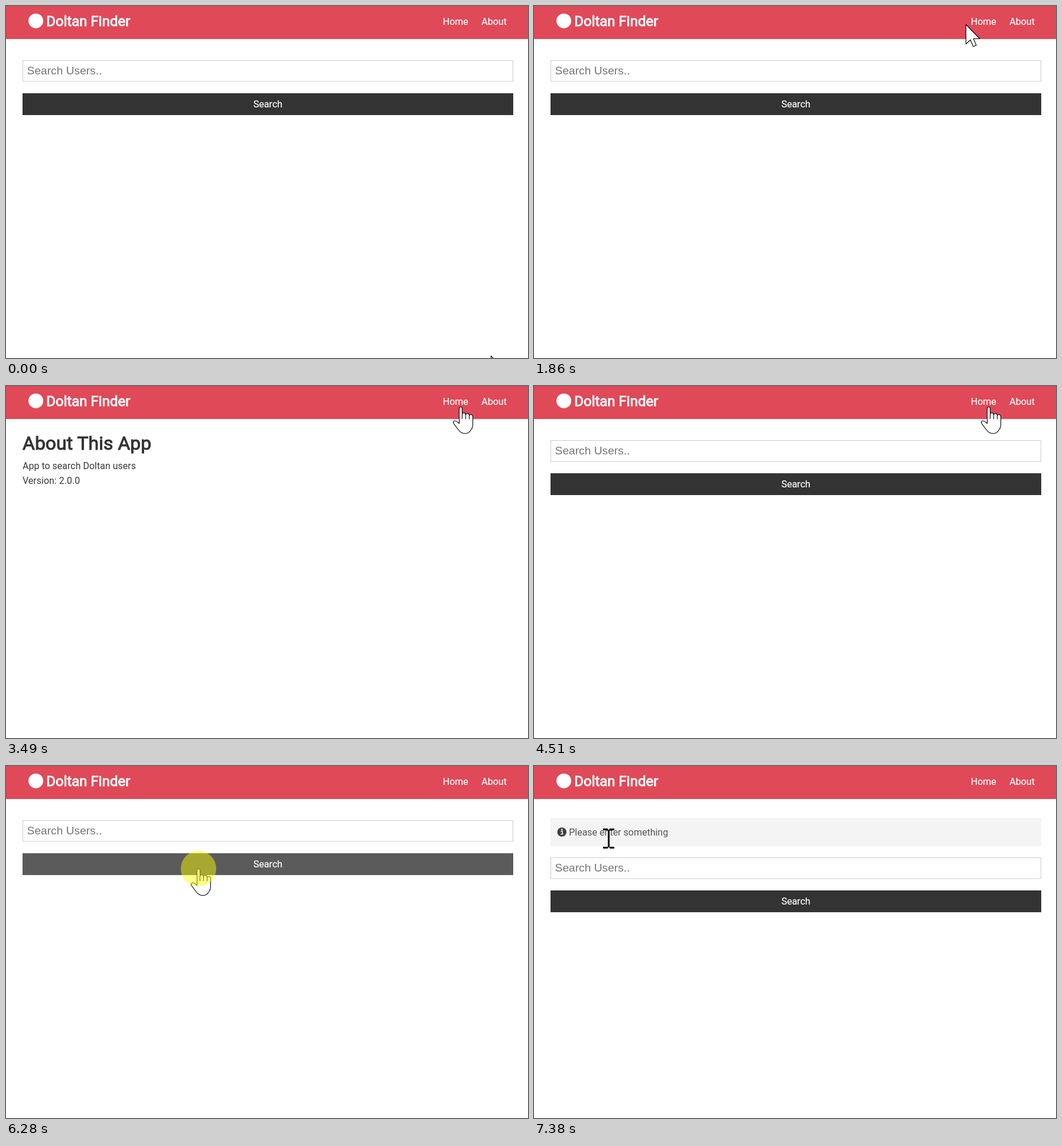
Write an HTML page that moves like this. It is 884 by 597 pixels and loops after 7.99 s.

```html
<!DOCTYPE html>
<html lang="en">
<head>
<meta charset="utf-8">
<title>Doltan Finder</title>
<style>
  html, body { margin: 0; width: 100%; height: 100%; overflow: hidden; background: #fff; }
  svg { display: block; width: 884px; height: 597px; }
  text { font: 16px Roboto, sans-serif; fill: #3a3a3a; white-space: pre; }
  .light { fill: #fff; stroke: #fff; stroke-width: .2px; }
  .logo { font-size: 24px; fill: #fff; stroke: #fff; stroke-width: .9px; }
  .title { font-size: 32px; fill: #333; stroke: #333; stroke-width: 1px; }
  .hint { font: 19.2px "Liberation Sans", Arial, sans-serif; fill: #757575; }
  .mouse { fill: #fff; stroke: #000; stroke-width: 1.1; stroke-linejoin: round; stroke-linecap: round; }
</style>
</head>
<body>
<svg viewBox="0 0 884 597">
  <rect width="884" height="56" fill="#e04958"/>
  <circle cx="50.5" cy="25.2" r="12.5" fill="#fff"/>
  <text class="logo" x="68.2" y="34">Doltan Finder</text>
  <text class="light" x="739.8" y="32">Home</text>
  <text class="light" x="805.3" y="32">About</text>

  <g id="aboutPage">
    <text class="title" x="28" y="108">About This App</text>
    <text x="28" y="141">App to search Doltan users</text>
    <text x="28" y="166">Version: 2.0.0</text>
  </g>

  <g id="searchPage">
    <g id="alert">
      <rect x="28" y="88" width="831" height="48" fill="#f4f4f4"/>
      <circle cx="47.2" cy="112" r="7.8" fill="#404040"/>
      <path d="M45.2 110.9h3v4.3M45 115.6h4.6" fill="none" stroke="#f4f4f4" stroke-width="1.5"/>
      <circle cx="47.2" cy="108" r="1.4" fill="#f4f4f4"/>
      <text x="59.2" y="118" fill-opacity=".85">Please enter something</text>
    </g>
    <g id="form">
      <rect x="28.5" y="92.5" width="830" height="35.5" fill="#fff" stroke="#ccc"/>
      <text class="hint" x="35.6" y="116">Search Users..</text>
      <rect id="button" x="28" y="148" width="831" height="37" fill="#333"/>
      <text class="light" x="443.5" y="172" text-anchor="middle">Search</text>
    </g>
  </g>

  <g id="cursor">
    <path class="mouse" id="arrow" d="M.5.5V33.5L8 26.5 13 37.8 18 35.7 13.3 24.5H24Z"/>
    <g class="mouse" id="hand">
      <path d="M-2.5 3Q-2.5.5 0 .5T2.5 3V12.5Q3 10.5 5.5 10.5T8.5 13.5Q9 11.5 11.5 11.5T14.5 15Q15 13.5 17.5 13.5T20.5 17V30Q20.5 36 17 40 14 45.5 7.5 45.5 1 45.5-3 40.5L-11.7 29Q-13.8 25.5-11 24.2-8.5 23-2.5 28.5Z"/>
      <path fill="none" d="M2.5 12V20.5M8.5 13V20.5M14.5 14V21"/>
    </g>
    <path id="beam" d="M-9.5-17h8v3h-8zM1.5-17h8v3h-8zM-9.5 14h8v3h-8zM1.5 14h8v3h-8zM-1.5-15h3v30h-3z"/>
    <circle id="click" r="30" fill="#ff0" fill-opacity=".47"/>
  </g>
</svg>
<script>
const LOOP = 7990, TICK = 77.6, LEAD = 20;
const ABOUT = 33, HOME = 58, ALERT = 83; // ticks at which the page changes
const SHIFT = 63;                        // the alert pushes the form down

// Each move: first tick, last tick, x, y, power (over 1 speeds up, under 1 slows down)
const origin = [821, 593];
const moves = [
  [0, 3, 545, 359, 1],
  [4, 14, 204, 139, 1],
  [14, 16, 120, 76, .6],
  [19, 24, 731, 31, 1.4],
  [24, 28, 818, 31, .6],
  [41, 45, 770, 35, .6],
  [63, 69, 402, 108, 1.3],
  [69, 72, 327, 182, .6],
  [73, 77, 326, 174, 1],
  [90, 95, 126.5, 123, 1]
];

const ui = {};
document.querySelectorAll("[id]").forEach(el => ui[el.id] = el);
const show = (el, on) => el.setAttribute("visibility", on ? "inherit" : "hidden");

function pointer(n) {
  let [x, y] = origin;
  for (const [from, to, x1, y1, power] of moves) {
    if (n <= from) break;
    const k = Math.min(1, (n - from) / (to - from)) ** power;
    x += (x1 - x) * k;
    y += (y1 - y) * k;
  }
  return [x, y];
}

function state(n) {
  const [x, y] = pointer(n);
  const about = n >= ABOUT && n < HOME;
  const alert = n >= ALERT;
  const dy = alert ? SHIFT : 0;
  const over = (x0, y0, x1, y1) => x >= x0 && x < x1 && y >= y0 && y < y1;
  const button = !about && over(28, 148 + dy, 859, 185 + dy);
  const link = over(732.5, 10, 790, 43) || over(798, 10, 855, 43);
  const text = !about && over(28, 92 + dy, 859, 128 + dy) || alert && over(59, 100, 227, 125);
  const shape = button || link ? "hand" : text ? "beam" : "arrow";
  return { x, y, about, alert, dy, button, shape };
}

// The hover fade spreads over three ticks
const fade = n => [0, 1, 2].filter(i => state(n - i).button).length / 3;

function draw(time) {
  const n = Math.floor((time + LEAD) / TICK);
  const s = state(n);
  show(ui.aboutPage, s.about);
  show(ui.searchPage, !s.about);
  show(ui.alert, !s.about && s.alert);
  ui.form.setAttribute("transform", `translate(0 ${s.dy})`);
  ui.button.setAttribute("fill-opacity", 1 - .2 * fade(n));

  for (const shape of ["arrow", "hand", "beam"]) show(ui[shape], shape === s.shape);
  // A click lights up two ticks before its page change
  show(ui.click, [ABOUT, HOME, ALERT].some(t => n >= t - 2 && n < t));
  const x = s.shape === "beam" ? Math.floor(s.x) + .5 : Math.round(s.x);
  ui.cursor.setAttribute("transform", `translate(${x} ${Math.round(s.y)})`);
}

const start = performance.now();
function frame() {
  draw((performance.now() - start) % LOOP);
  requestAnimationFrame(frame);
}
frame();
</script>
</body>
</html>
```
